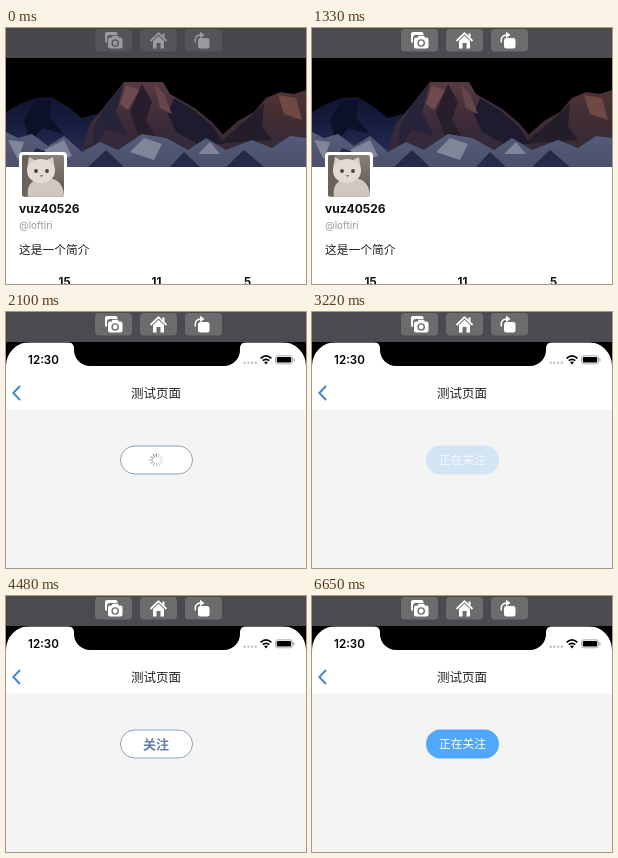
These frames come from a looping animation (300x256 px, 8.4 s). An HTML page with a canvas:

```html
<!DOCTYPE html>
<html lang="zh-CN">
<head>
<meta charset="utf-8">
<title>测试页面</title>
<style>
html, body { margin: 0; width: 100%; height: 100%; overflow: hidden; background: #000; }
canvas { display: block; width: 300px; height: 256px; }
</style>
</head>
<body>
<canvas id="stage" width="300" height="256"></canvas>
<script>
const ctx = document.getElementById('stage').getContext('2d');
const LOOP = 8400, STEP = 70, WIDTH = 300;
const LATIN = 'Inter, "Liberation Sans", sans-serif';
const HAN = '"Noto Sans CJK SC", "Noto Sans CJK", sans-serif';
const BLUE = '#50a7fb', SLATE = '#8c9fb2';

function text(value, x, y, font, color, align = 'left') {
  ctx.font = font;
  ctx.fillStyle = color;
  ctx.textAlign = align;
  ctx.fillText(value, x, y);
}

function rect(x, y, w, h, color) {
  ctx.fillStyle = color;
  ctx.fillRect(x, y, w, h);
}

function pill(x, y, w, h, r, color) {
  ctx.beginPath();
  ctx.roundRect(x, y, w, h, r);
  ctx.fillStyle = color;
  ctx.fill();
}

function disc(x, y, r, color) {
  ctx.beginPath();
  ctx.arc(x, y, r, 0, Math.PI * 2);
  ctx.fillStyle = color;
  ctx.fill();
}

function shape(path, color) {
  ctx.fillStyle = color;
  ctx.fill(new Path2D(path));
}

function line(path, color, width) {
  ctx.strokeStyle = color;
  ctx.lineWidth = width;
  ctx.stroke(new Path2D(path));
}

function fade(y0, y1, ...colors) {
  const g = ctx.createLinearGradient(0, y0, 0, y1);
  colors.forEach((c, i) => g.addColorStop(i / (colors.length - 1), c));
  return g;
}

function drawToolbar(active) {
  const back = active ? '#4b4a4e' : '#48474b';
  const key = active ? '#6c6b6e' : '#555458';
  const icon = active ? '#fff' : '#9b9a9d';
  rect(0, 0, WIDTH, 30, back);
  for (const x of [89, 134, 179]) pill(x, 1, 37, 22.5, 4, key);

  // camera in front of a second picture
  pill(99, 4, 12.5, 11, 2, icon);
  pill(101, 7, 16, 14, 3, key);
  pill(102, 9.5, 14.5, 11, 2, icon);
  pill(106, 7.8, 6.5, 4, 1, icon);
  disc(109.2, 15, 3.8, key);
  disc(109.2, 15, 2.4, icon);

  // house
  line('M144.5 13 L152.5 5.2 L160.5 13', icon, 1.8);
  shape('M147 13 L152.5 7.8 L158 13 V20.5 H154.5 V15 H150.5 V20.5 H147 Z', icon);
  rect(156.5, 5.5, 2, 4, icon);

  // rotate
  pill(192, 10, 11.5, 10.5, 2.5, icon);
  line('M189.3 14.5 C188.6 9.5 190.5 7 195 7', icon, 1.5);
  shape('M194 3.8 L198.5 7 L194 10.2 Z', icon);
}

function drawMountains() {
  rect(0, 30, WIDTH, 109, '#000');
  shape('M0 84 L14 76 L30 70 L46 69 L62 79 L76 90 L90 86 L110 98 L120 139 H0 Z',
    fade(68, 139, '#10122e', '#1b2145', '#2d3557'));
  shape('M70 139 L84 96 L98 79 L118 54 H157 L164 66 L190 81 L207 95 L220 110 L226 139 Z',
    fade(54, 139, '#553a42', '#3b2a37', '#2b2a40'));
  shape('M190 139 L215 108 L232 93 L248 84 L260 70 L274 64 L288 66 L300 62 V139 Z',
    fade(62, 139, '#4e3335', '#3d2b33', '#2c2b3c'));

  // shaded faces
  shape('M30 72 L46 72 L44 90 L58 106 L36 100 L24 116 L18 92 Z', '#0d1029');
  shape('M98 80 L118 55 L110 84 L122 108 L100 102 L86 124 L88 98 Z', '#26233a');
  shape('M136 56 L146 74 L140 92 L154 116 L132 106 L124 84 Z', '#281d2a');
  shape('M168 70 L188 82 L206 98 L218 116 L192 116 L170 104 L162 86 Z', '#1d1b2d');
  shape('M246 87 L258 75 L256 98 L266 112 L234 114 L212 116 Z', '#231c29');

  // lit faces
  shape('M120 57 L133 62 L122 82 L114 76 Z', '#6e4a4e');
  shape('M148 56 L158 66 L166 86 L154 80 Z', '#684549');
  shape('M272 67 L290 70 L296 92 L278 86 Z', '#704842');

  // snowy foreground
  shape('M0 104 L12 110 L26 106 L42 118 L58 108 L76 124 L94 114 L112 122 L136 106 L160 110 L182 122 L200 110 L220 122 L246 112 L266 120 L284 108 L300 110 V139 H0 Z',
    fade(104, 139, '#555d7a', '#4b506b'));
  shape('M20 139 L30 120 L44 125 L52 139 Z M82 139 L100 122 L118 139 Z M164 139 L178 124 L194 139 Z M220 139 L238 122 L258 139 Z', '#242a47');
  shape('M2 112 L18 114 L12 132 Z M38 122 L58 112 L66 128 L48 134 Z M124 124 L138 110 L156 116 L148 132 Z M192 126 L204 114 L214 126 Z', '#80859a');
}

function drawAvatar() {
  pill(13, 124, 48, 47, 4, '#fff');
  ctx.save();
  ctx.beginPath();
  ctx.roundRect(16, 127, 42, 41.5, 2);
  ctx.clip();
  rect(16, 127, 42, 42, fade(127, 169, '#8a8178', '#5b524a'));
  rect(16, 127, 7, 42, '#6b625b');
  shape('M22 169 C20 157 26 150 40 150 C52 150 58 157 58 169 Z', '#cfc8c0');
  shape('M21 141 L23 129 L30 133 H39 L47 129 L49 142 Z', '#d6cfc7');
  ctx.beginPath();
  ctx.ellipse(35, 143, 14, 12, 0, 0, Math.PI * 2);
  ctx.fillStyle = '#e2dcd5';
  ctx.fill();
  disc(30, 143, 1.9, '#45403b');
  disc(41, 143, 1.9, '#45403b');
  shape('M33.5 147 H37.5 L35.5 149.5 Z', '#9d827b');
  ctx.restore();
}

function drawProfile(shift) {
  ctx.save();
  ctx.translate(shift, 0);
  rect(0, 30, WIDTH, 226, '#fff');
  drawMountains();
  drawAvatar();
  text('vuz40526', 13, 185, `700 12px ${LATIN}`, '#111');
  text('@loftiri', 13, 201, `400 10px ${LATIN}`, '#999');
  text('这是一个简介', 13, 226, `400 11.75px ${HAN}`, '#222');
  [['15', 58.5], ['11', 150.5], ['5', 241.5]].forEach(([n, x]) =>
    text(n, x, 258, `700 11.5px ${LATIN}`, '#111', 'center'));
  ctx.restore();
}

function drawSpinner(t, color) {
  const tick = Math.floor(t * 12 / 1000 - 0.45);
  ctx.save();
  ctx.translate(150.5, 148);
  ctx.lineCap = 'round';
  for (let i = 0; i < 12; i++) {
    const age = ((tick - i) % 12 + 12) % 12;
    ctx.save();
    ctx.rotate(i * Math.PI / 6);
    ctx.globalAlpha *= Math.max(0.28, 1 - age * 0.09);
    line('M0 -3.7 V-6.5', color, 1.25);
    ctx.restore();
  }
  ctx.restore();
}

function buttonState(t) {
  const release = start => Math.min(1, 0.2 + 0.8 * (t - start + STEP) / 350);
  if (t < 2380) return { loading: true };
  if (t < 3220) return { following: true };
  if (t < 3430) return { following: true, alpha: 0.2 };
  if (t < 4480) return { following: true, loading: true, alpha: release(3430) };
  if (t < 5390) return {};
  if (t < 5600) return { alpha: 0.2 };
  if (t < 6650) return { loading: true, alpha: release(5600) };
  return { following: true };
}

function drawButton(t) {
  const { following = false, loading = false, alpha = 1 } = buttonState(t);
  if (!following) pill(114, 133.5, 73, 29, 14.5, '#fff');
  ctx.save();
  ctx.globalAlpha = alpha;
  if (following) {
    pill(114, 133.5, 73, 29, 14.5, BLUE);
  } else {
    ctx.beginPath();
    ctx.roundRect(114.5, 134, 72, 28, 14);
    ctx.strokeStyle = SLATE;
    ctx.lineWidth = 1;
    ctx.stroke();
  }
  if (loading) {
    drawSpinner(t, following ? '#fff' : '#8796a4');
  } else if (following) {
    ctx.globalAlpha = Math.max(alpha, 0.75);
    text('正在关注', 150.5, 152.3, `400 11.8px ${HAN}`, '#fff', 'center');
  } else {
    text('关注', 150, 152.8, `700 13px ${HAN}`, '#5f7fae', 'center');
  }
  ctx.restore();
}

function drawTestPage(offset, t) {
  ctx.save();
  ctx.translate(offset, 0);
  rect(0, 30, WIDTH, 68, '#fff');
  rect(0, 97.5, WIDTH, 158.5, '#f4f4f4');
  text('测试页面', 150, 86, `500 12.5px ${HAN}`, '#222', 'center');
  ctx.globalAlpha = Math.max(0, 1 - offset / 100);
  line('M14 74 L7.3 81 L14 88', '#3f88c5', 1.9);
  ctx.globalAlpha = 1;
  drawButton(t);
  ctx.restore();
}

function drawStatusBar() {
  text('12:30', 22, 52, `600 11.6px ${LATIN}`, '#000');
  for (let i = 0; i < 4; i++) disc(238.7 + i * 3.7, 50.8, 1.2, 'rgba(0,0,0,.25)');

  line('M254.6 46.3 Q260 41.6 265.4 46.3', '#000', 1.7);
  line('M256.7 48.7 Q260 45.9 263.3 48.7', '#000', 1.6);
  shape('M258 50.3 Q260 48.7 262 50.3 L260 52.4 Z', '#000');

  ctx.beginPath();
  ctx.roundRect(269.5, 43.8, 17, 8, 2.3);
  ctx.strokeStyle = 'rgba(0,0,0,.4)';
  ctx.lineWidth = 0.8;
  ctx.stroke();
  pill(270.8, 45.1, 14.4, 5.4, 1.2, '#000');
  pill(287.4, 46.3, 1.1, 3, 0.5, 'rgba(0,0,0,.4)');
}

function drawBezel() {
  rect(0, 30, WIDTH, 0.6, '#000');
  shape('M62 30 A6 6 0 0 1 68 36 V38 A16 16 0 0 0 84 54 H218 A16 16 0 0 0 234 38 V36 A6 6 0 0 1 240 30 Z', '#000');
  shape('M0 30 H24 A24 24 0 0 0 0 54 Z', '#000');
  shape('M300 30 H276 A24 24 0 0 1 300 54 Z', '#000');
}

// Critically damped push from the right edge.
function pushOffset(t) {
  const k = 25.6 * Math.max(0, t - 1387) / 1000;
  return t >= 1820 ? 0 : Math.round(WIDTH * (1 + k) * Math.exp(-k));
}

// The screen stalls briefly near the end of the push.
function frameTime(now) {
  const t = Math.floor((now % LOOP) / STEP) * STEP;
  return t > 1540 && t < 1820 ? 1540 : t;
}

function render(t) {
  const offset = pushOffset(t);
  if (offset > 0) drawProfile(-0.3 * (WIDTH - offset));
  if (offset < WIDTH) drawTestPage(offset, t);
  drawStatusBar();
  drawBezel();
  drawToolbar(t >= 980);
}

const start = performance.now();
function loop() {
  render(frameTime(performance.now() - start));
  requestAnimationFrame(loop);
}
loop();
</script>
</body>
</html>
```
